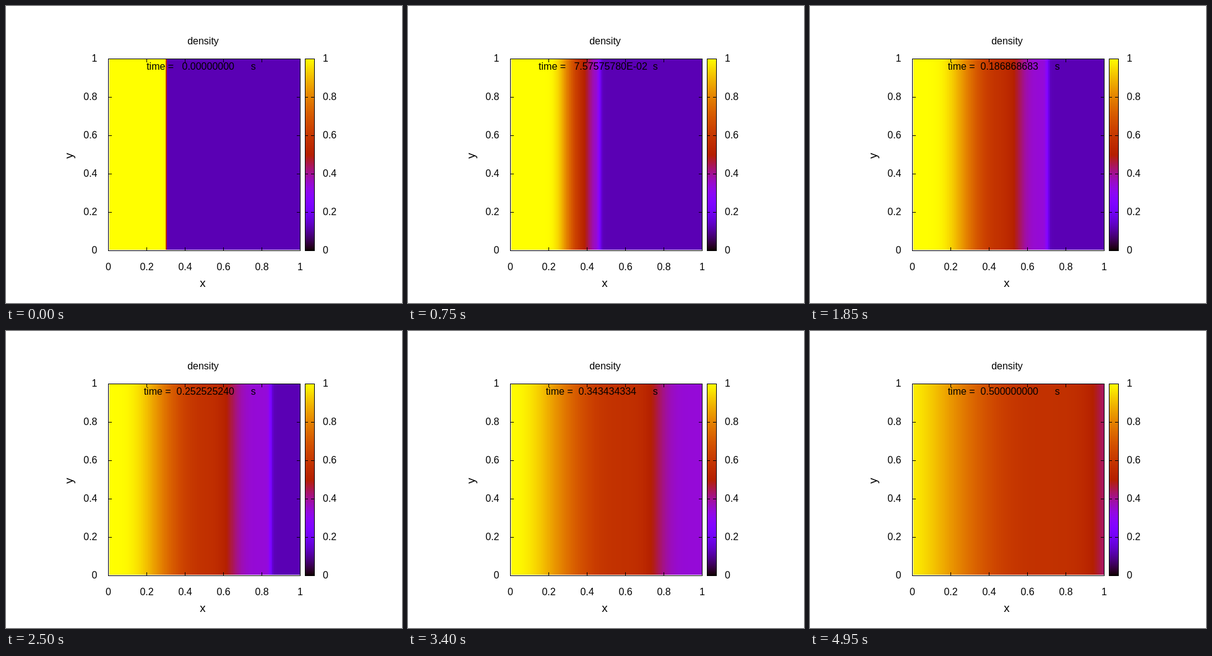
An HTML page that plays this animation: 640 by 480 pixels, repeating every 5000 ms.

```html
<!DOCTYPE html>
<html lang="en">
<head>
<meta charset="utf-8">
<title>density</title>
<style>
  html, body { margin: 0; width: 100%; height: 100%; overflow: hidden; background: #fff; }
  svg { display: block; width: 640px; height: 480px; }
  text { font: 16px "Liberation Sans", Arial, sans-serif; white-space: pre; }
  .name { font-size: 18.67px; }
  rect, path { shape-rendering: crispEdges; }
</style>
</head>
<body>
<svg id="stage" viewBox="0 0 640 480"></svg>
<script>
const svg = document.getElementById("stage");
const LEFT = 165, TOP = 85, SIZE = 310, BAR = 483, BAR_W = 15;

function add(tag, attrs, text) {
  const el = document.createElementNS("http://www.w3.org/2000/svg", tag);
  for (const k in attrs) el.setAttribute(k, attrs[k]);
  if (text !== undefined) el.textContent = text;
  svg.appendChild(el);
  return el;
}

// Black - violet - red - yellow palette for a value in 0..1
function colour(v) {
  v = Math.min(1, Math.max(0, v));
  const c = [Math.sqrt(v), v ** 3, Math.max(0, Math.sin(2 * Math.PI * v))];
  return `rgb(${c.map(x => Math.round(255 * x)).join()})`;
}

// Shock tube: 1D Euler equations, Lax-Friedrichs scheme
const N = 200, FRAMES = 100, STEPS = 3, T_END = 0.5, GAMMA = 1.4;
const dx = 1 / N, dt = T_END / (FRAMES - 1) / STEPS;

function state(rho, u, p) {
  return [rho, rho * u, p / (GAMMA - 1) + rho * u * u / 2];
}

function flux([rho, m, e]) {
  const u = m / rho, p = (GAMMA - 1) * (e - m * u / 2);
  return [m, m * u + p, u * (e + p)];
}

function advance(cells) {
  const f = cells.map(flux), k = dt / (2 * dx);
  return cells.map((_, i) => {
    const a = Math.max(0, i - 1), b = Math.min(N - 1, i + 1);
    return [0, 1, 2].map(q => (cells[a][q] + cells[b][q]) / 2 - k * (f[b][q] - f[a][q]));
  });
}

function simulate() {
  let cells = Array.from({ length: N }, (_, i) =>
    i < 0.3 * N ? state(1, 0.75, 1) : state(0.125, 0, 0.1));
  const out = [];
  for (let n = 0; n < FRAMES; n++) {
    out.push(cells.map(c => c[0]));
    for (let s = 0; s < STEPS; s++) cells = advance(cells);
  }
  return out;
}

function timeLabel(n) {
  const t = Math.fround(n * T_END / (FRAMES - 1));
  if (t === 0) return "time =   0.00000000      s";
  if (t >= 0.1) return `time =  ${t.toFixed(9)}      s`;
  return `time =   ${t.toExponential(8).replace("e-", "E-0")}  s`;
}

// Field strips
const edge = k => k < N - 1 ? Math.round(LEFT + (k + 1) * dx * SIZE) : LEFT + SIZE;
const strips = Array.from({ length: N - 1 }, (_, k) =>
  add("rect", { x: edge(k), y: TOP + 1, width: edge(k + 1) - edge(k), height: SIZE - 2 }));

// Colour bar
for (let y = 0; y < SIZE; y++)
  add("rect", { x: BAR, y: TOP + y, width: BAR_W, height: 1, fill: colour(1 - y / SIZE) });

// Frames, ticks and tick labels
const R = LEFT + SIZE, B = TOP + SIZE;
let d = `M${LEFT + .5} ${TOP + .5}h${SIZE}v${SIZE}h${-SIZE}z` +
        `M${BAR + .5} ${TOP + .5}h${BAR_W}v${SIZE}h${-BAR_W}z`;
for (let i = 0; i <= 5; i++) {
  const x = LEFT + i * SIZE / 5, y = B - i * SIZE / 5, label = String(i / 5);
  if (i % 5) {
    d += `M${x + .5} ${B}v-5M${x + .5} ${TOP + 1}v5` +
         `M${LEFT + 1} ${y + .5}h5M${R} ${y + .5}h-5` +
         `M${BAR + 1} ${y + .5}h4M${BAR + BAR_W} ${y + .5}h-5`;
  }
  add("text", { x: x + .5, y: 427, "text-anchor": "middle" }, label);
  add("text", { x: 147.5, y: y + 5, "text-anchor": "end" }, label);
  add("text", { x: 512, y: y + 5 }, label);
}
add("path", { d, fill: "none", stroke: "#000" });

add("text", { x: 318.5, y: 62, "text-anchor": "middle" }, "density");
add("text", { x: 318, y: 454, "text-anchor": "middle", class: "name" }, "x");
add("text", { transform: "translate(108 242) rotate(-90)", "text-anchor": "middle", class: "name" }, "y");
const clock = add("text", { x: 403.7, y: 103, "text-anchor": "end" }, "");

const density = simulate();
let shown = -1;

function draw(ms) {
  const n = Math.floor(ms / 50) % FRAMES;
  if (n === shown) return;
  shown = n;
  const rho = density[n];
  strips.forEach((s, k) => s.setAttribute("fill", colour((rho[k] + rho[k + 1]) / 2)));
  clock.textContent = timeLabel(n);
}

const start = performance.now();
function tick() {
  draw(performance.now() - start);
  requestAnimationFrame(tick);
}
tick();
</script>
</body>
</html>
```
